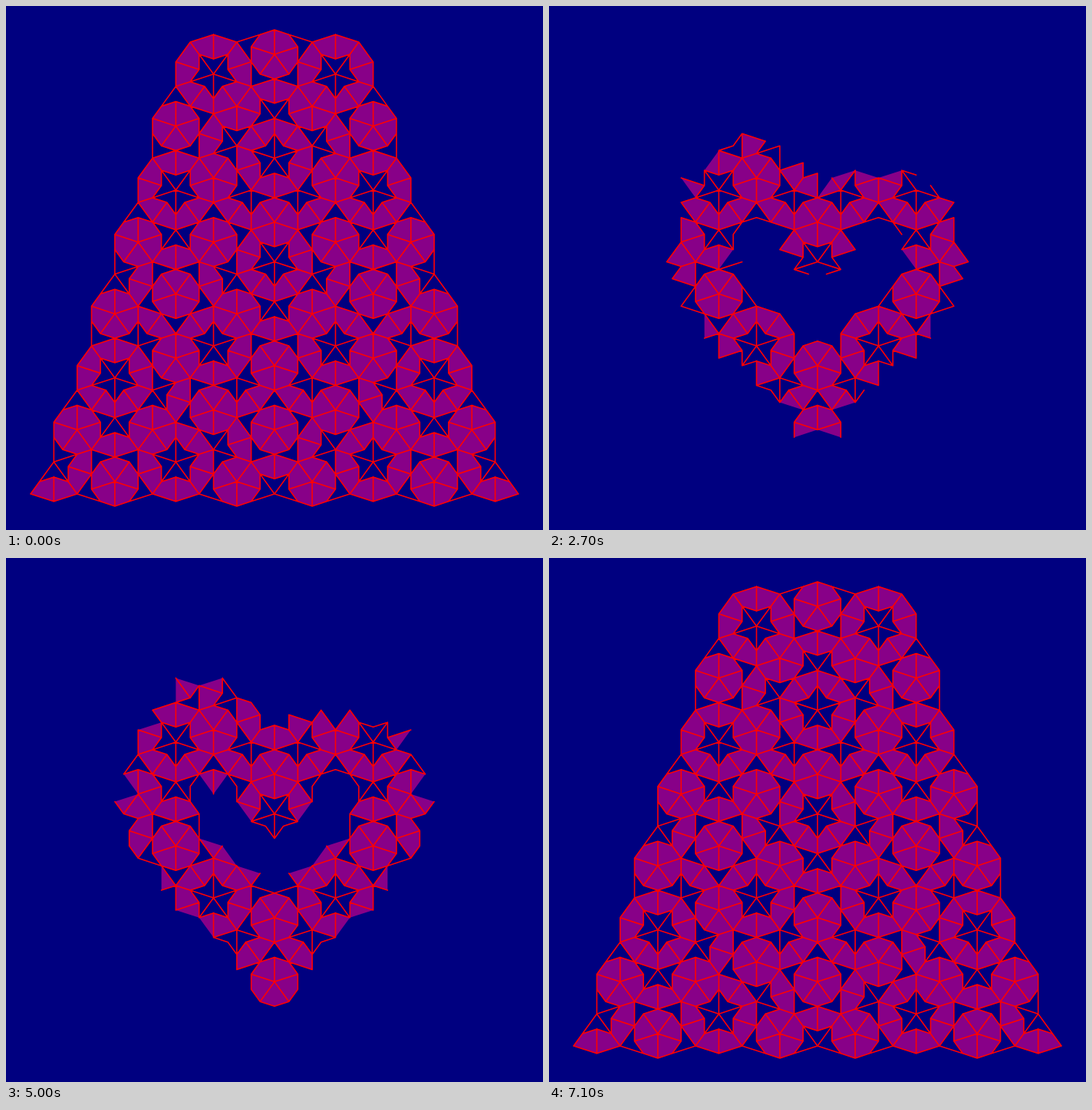
An HTML page with a canvas for the animation above (7.6 s loop, 700 by 683 pixels).

```html
<!DOCTYPE html>
<html lang="en">
<head>
<meta charset="utf-8">
<title>Penrose heart</title>
<style>
  html, body { margin: 0; height: 100%; overflow: hidden; background: #000080; }
  canvas { display: block; }
</style>
</head>
<body>
<canvas id="stage" width="700" height="683"></canvas>
<script>
const ctx = document.getElementById('stage').getContext('2d');
const PHI = (1 + Math.sqrt(5)) / 2;
const CX = 350, CY = 198.25, EDGE = 31.93, LEVELS = 7;
const STEPS = 29, STEP_MS = 100, LOOP_MS = 7600;

const polar = (r, deg) => {
  const a = deg * Math.PI / 180;
  return [CX + r * Math.cos(a), CY + r * Math.sin(a)];
};
const mix = (p, q, k) => [p[0] + (q[0] - p[0]) * k, p[1] + (q[1] - p[1]) * k];

// Half tiles: kite = tip, side, far corner; dart = tip, wing, notch.
// In both, a-b and b-c are tile edges and a-c is the hidden mirror axis.
const half = (kite, a, b, c) => ({ kite, a, b, c });

function deflate({ kite, a, b, c }) {
  const p = mix(a, b, 1 / PHI);
  if (!kite) return [half(true, a, p, c), half(false, b, c, p)];
  const v = mix(a, c, 1 / PHI), q = mix(a, b, 1 / PHI ** 2);
  return [half(false, a, v, q), half(true, b, c, v), half(true, b, q, v)];
}

function trace(path, { a, b, c }) {
  path.moveTo(...a);
  path.lineTo(...b);
  path.lineTo(...c);
}

// Three sides of a pentagon around the centre star, plus a base line.
function inTrapezoid({ x, y }) {
  const reach = deg => {
    const [nx, ny] = polar(1, deg);
    return (x - CX) * (nx - CX) + (y - CY) * (ny - CY);
  };
  return [-90, -18, 198].every(deg => reach(deg) < 157) && reach(90) < 443.5;
}

// A sun of ten half kites, deflated and cut to the trapezoid.
function buildTiling() {
  const radius = EDGE * PHI ** LEVELS;
  let tiles = [];
  for (let spoke = -90; spoke < 270; spoke += 72)
    for (const side of [-36, 36])
      tiles.push(half(true, [CX, CY], polar(radius, spoke), polar(radius, spoke + side)));
  for (let i = 0; i < LEVELS; i++) tiles = tiles.flatMap(deflate);
  for (const t of tiles) {
    t.x = (t.a[0] + t.b[0] + t.c[0]) / 3;
    t.y = (t.a[1] + t.b[1] + t.c[1]) / 3;
  }
  return tiles.filter(inTrapezoid);
}

const heart = Array.from({ length: 360 }, (_, deg) => {
  const t = deg * Math.PI / 180;
  return [
    CX + 9.6 * 16 * Math.sin(t) ** 3,
    357 - 9.85 * (13 * Math.cos(t) - 5 * Math.cos(2 * t) - 2 * Math.cos(3 * t) - Math.cos(4 * t))
  ];
});

function onHeart(tile) {
  const path = new Path2D();
  trace(path, tile);
  return heart.some(([x, y]) => ctx.isPointInPath(path, x, y));
}

// Tiles far from the heart go first, earlier at the upper right than the upper left.
function erosionRank({ x, y }) {
  const bump = (bx, by) => Math.exp(-((x - bx) ** 2 + (y - by) ** 2) / (2 * 70 ** 2));
  const distance = Math.min(...heart.map(([hx, hy]) => Math.hypot(x - hx, 0.85 * (y - hy))));
  return distance + 60 * bump(420, 90) - 45 * bump(250, 100);
}

function schedule(tiles) {
  for (const t of tiles) {
    t.gone = Infinity;
    t.rank = erosionRank(t);
  }
  const loose = tiles.filter(t => t.rank > EDGE || !onHeart(t));
  loose.sort((p, q) => q.rank - p.rank);
  loose.forEach((t, i) => { t.gone = 1 + Math.floor(i / loose.length * STEPS); });
}

const tiles = buildTiling();
schedule(tiles);

function draw(step) {
  const kites = new Path2D(), edges = new Path2D();
  for (const t of tiles) {
    if (t.gone <= step) continue;
    if (t.kite) trace(kites, t);
    trace(edges, t);
  }
  ctx.fillStyle = '#000080';
  ctx.fillRect(0, 0, 700, 683);
  ctx.fillStyle = '#880088';
  ctx.fill(kites);
  ctx.strokeStyle = '#ff0000';
  ctx.lineWidth = EDGE / 20;
  ctx.lineJoin = ctx.lineCap = 'round';
  ctx.stroke(edges);
}

let shown = -1;
function frame() {
  const tick = Math.floor(performance.now() % LOOP_MS / STEP_MS);
  const step = Math.max(0, Math.min(tick - 4, 71 - tick, STEPS));
  if (step !== shown) draw(shown = step);
  requestAnimationFrame(frame);
}
frame();
</script>
</body>
</html>
```
